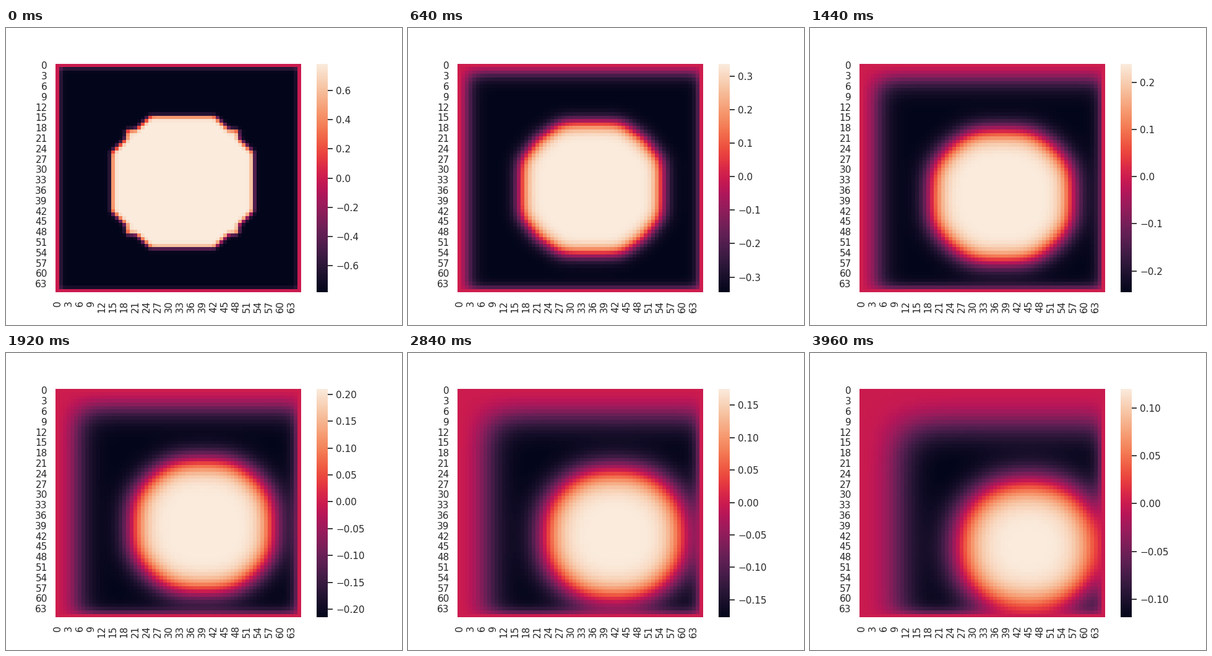
These frames come from a looping animation (640 by 480 pixels, 4 s). A matplotlib script:

```python
import numpy as np
import matplotlib.pyplot as plt
from matplotlib.animation import FuncAnimation
from matplotlib.colors import LinearSegmentedColormap

N = 66
FRAMES = 100
SUBSTEPS = 2
DIFFUSION = 0.09
SPEED = 0.057
INK = "0.15"

plt.rcParams.update({"font.family": "DejaVu Sans", "font.size": 11})


def make_cmap():
    """Dark violet through crimson to cream, from evenly spaced samples."""
    rows = [
        "#221331 #451c47 #691f55 #921c5b #b91657 "
        "#d92847 #ed503e #f47d57 #f6a47c #f7c9aa",
        "#35193e #701f57 #ad1759 #e13342 #f37651 #f6b48f",
        "#4c1d4b #a11a5b #e83f3f #f69c73",
        "#611f53 #cb1b4f #f4875e",
    ]
    stops = [(0.0, "#03051a"), (1.0, "#faebdd")]
    for row in rows:
        shades = row.split()
        stops += [((k + 1) / (len(shades) + 1), c) for k, c in enumerate(shades)]
    return LinearSegmentedColormap.from_list("ember", sorted(stops), N=256)


def clear_border(u):
    u[[0, -1], :] = 0
    u[:, [0, -1]] = 0


def start_field():
    """A blocky disc: a square joined with a clipped diamond."""
    d = np.abs(np.arange(N) - 33.5)
    dx, dy = np.meshgrid(d, d)
    far = np.maximum(dx, dy)
    disc = (far < 15) | ((dx + dy < 27.5) & (far < 19))
    u = np.where(disc, 0.935, -0.92)
    clear_border(u)
    return u


def step(u):
    """One explicit step of advection, diffusion and cubic decay."""
    c = u[1:-1, 1:-1]
    up, down = u[:-2, 1:-1], u[2:, 1:-1]
    left, right = u[1:-1, :-2], u[1:-1, 2:]
    rate = np.where(c > 0, 0.107, 0.1012)
    new = np.zeros_like(u)
    new[1:-1, 1:-1] = (
        c
        + DIFFUSION * (up + down + left + right - 4 * c)
        - SPEED / 2 * (down - up + right - left)
        - rate * c**3
    )
    return new


def solve():
    u = start_field()
    fields = []
    for _ in range(FRAMES - 1):
        for _ in range(SUBSTEPS):
            u = step(u)
        fields.append(u)
    fields.append(0.8 * u)  # the last field only fades
    return fields


fields = solve()

fig, ax = plt.subplots(figsize=(6.4, 4.8), dpi=100)
mesh = ax.pcolormesh(fields[0], cmap=make_cmap())
ax.set(xlim=(0, N), ylim=(N, 0))
ax.spines[:].set_visible(False)

ticks = np.arange(0, N - 2, 3)
ax.set_xticks(ticks + 0.5, ticks, rotation="vertical")
ax.set_yticks(ticks + 0.5, ticks)
ax.tick_params(length=6, left=False, bottom=False, labelcolor=INK)

bar = fig.colorbar(mesh, ax=ax)
bar.outline.set_linewidth(0)
bar.ax.tick_params(length=6, width=1.25, color=INK, labelcolor=INK)


def draw(i):
    u = fields[i]
    mesh.set_array(u)
    mesh.set_clim(u.min(), u.max())
    return (mesh,)


anim = FuncAnimation(fig, draw, frames=FRAMES, init_func=lambda: draw(0),
                     interval=40, repeat=True, repeat_delay=0, blit=False)
plt.show()
```
